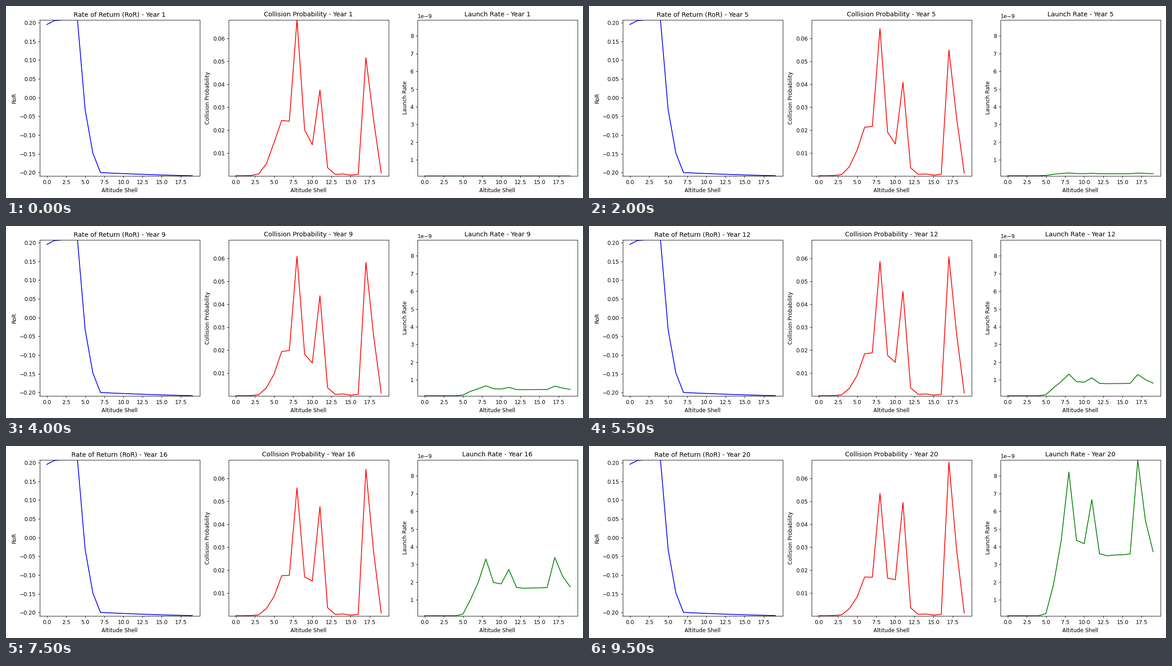
A matplotlib script that plays this animation: 1280x427 px, repeating every 10000 ms.

```python
import matplotlib.pyplot as plt
import numpy as np
from matplotlib.animation import FuncAnimation

WIDTH, HEIGHT, DPI = 1280, 427, 1280 / 15
YEARS = 20
SHELLS = np.arange(20)

plt.rcParams["font.family"] = "DejaVu Sans"


def rate_of_return():
    """Return per (year, shell): a plateau, a steep drop, a slow decline."""
    u = (SHELLS - 7) / 12
    base = -0.2001 - 0.0085 * u - 0.003 * u * (1 - u)
    base[:7] = [0.1951, 0.2056, 0.2070, 0.2073, 0.2074, -0.0322, -0.1474]
    drift = np.linspace(0, 0.0005, YEARS)
    return base + drift[:, None]


def collision_probability():
    """Each shell eases exponentially from a start to an end value."""
    steady = {2: 0.0001, 12: 0.0035, 13: 0.0006, 14: 0.0008,
              15: 0.0003, 16: 0.0006, 19: 0.0012}
    # shell: (start, end, bend)
    moving = {
        3: (0.0008, 0.0004, 5.0),
        4: (0.0052, 0.0031, 4.2),
        5: (0.0145, 0.0081, 3.4),
        6: (0.0241, 0.0169, 2.1),
        7: (0.0238, 0.0168, 1.3),
        8: (0.0680, 0.0533, 0.55),
        9: (0.0200, 0.0164, 0.9),
        10: (0.0135, 0.0157, -0.6),
        11: (0.0374, 0.0494, 0.8),
        17: (0.0515, 0.0671, 0.05),
        18: (0.0245, 0.0290, 0.05),
    }
    u = np.linspace(0, 1, YEARS)
    prob = np.full((YEARS, len(SHELLS)), 2e-5)
    for shell, value in steady.items():
        prob[:, shell] = value
    for shell, (start, end, bend) in moving.items():
        left = (np.exp(-bend * u) - np.exp(-bend)) / (1 - np.exp(-bend))
        prob[:, shell] = end + (start - end) * left
    return prob


def launch_rate(ror, prob):
    """Launches compound by the excess of collision probability over return."""
    growth = 1 + np.maximum(0, prob - ror)[:-1]
    first = np.ones((1, len(SHELLS)))
    return 1e-10 * np.cumprod(np.vstack([first, growth]), axis=0)


ror = rate_of_return()
prob = collision_probability()
launches = launch_rate(ror, prob)

# title, y label, colour, y limits, data
PANELS = [
    ("Rate of Return (RoR)", "RoR", "b", (-0.2085, 0.2079), ror),
    ("Collision Probability", "Collision Probability", "r",
     (1e-5, 0.06804), prob),
    ("Launch Rate", "Launch Rate", "g", (1e-10, 8.91e-9), launches),
]

fig = plt.figure(figsize=(WIDTH / DPI, HEIGHT / DPI), dpi=DPI,
                 facecolor="white")


def add_panel(index, ylabel, color, ylim):
    left = 74.5 + 419 * index
    ax = fig.add_axes([left / WIDTH, 49.5 / HEIGHT,
                       355 / WIDTH, 347 / HEIGHT])
    ax.set_xlim(-0.95, 19.95)
    ax.set_ylim(*ylim)
    ax.set_xlabel("Altitude Shell")
    ax.set_ylabel(ylabel)
    line, = ax.plot(SHELLS, np.zeros(len(SHELLS)), color=color)
    ax.set_xlim(-0.95, 19.95)
    return ax, line


views = [add_panel(i, ylabel, color, ylim)
         for i, (_, ylabel, color, ylim, _) in enumerate(PANELS)]


def update(frame):
    artists = []
    for (ax, line), (title, _, _, _, data) in zip(views, PANELS):
        line.set_ydata(data[frame])
        artists += [line, ax.set_title(f"{title} - Year {frame + 1}")]
    return artists


anim = FuncAnimation(fig, update, frames=YEARS, interval=500, repeat=True)
plt.show()
```
